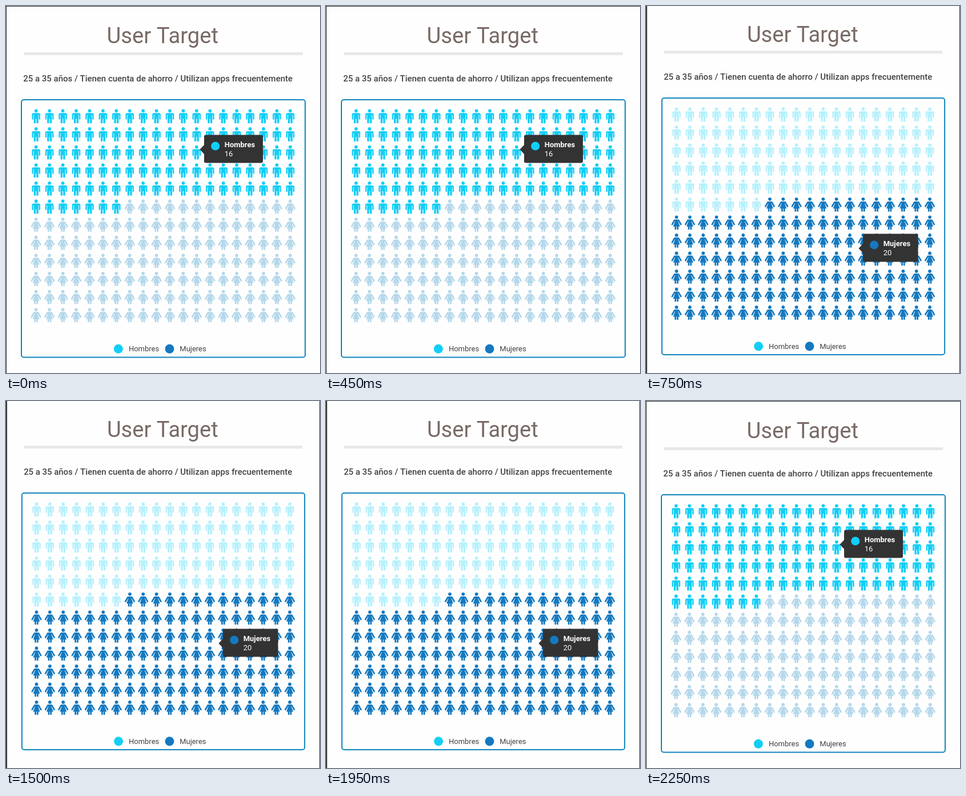
Animation of 550 by 642 pixels, one loop 3 s. Source, as an HTML page with a canvas:

```html
<!DOCTYPE html>
<html lang="es">
<head>
<meta charset="utf-8">
<title>User Target</title>
<style>
  html, body { margin: 0; width: 100%; height: 100%; overflow: hidden; background: #fefefe; }
  canvas { display: block; }
</style>
</head>
<body>
<canvas id="stage" width="550" height="642"></canvas>
<script>
const ctx = document.getElementById('stage').getContext('2d');
const LOOP = 3000;
const COLS = 20, ROWS = 12, MEN = 107;
const CYAN = '#12cef6', BLUE = '#1479bf', DARK = '#333333';
const PALE_CYAN = '#b6f1fd', PALE_BLUE = '#b5d8eb';

const men = {
  scale: 1, dx: 0, dy: 0, man: CYAN, woman: PALE_BLUE,
  tip: { x: 347, y: 226, w: 103, color: CYAN, label: 'Hombres', value: '16' }
};
const women = {
  scale: 0.9965, dx: 0.96, dy: -2.4, man: PALE_CYAN, woman: BLUE,
  tip: { x: 380, y: 399, w: 96.5, color: BLUE, label: 'Mujeres', value: '20' }
};

function polygon(path, ...points) {
  points.forEach(([x, y], i) => i ? path.lineTo(x, y) : path.moveTo(x, y));
  path.closePath();
}

// Both icons are 25 high, centred on x = 0, with the head at the top.
function manShape() {
  const p = new Path2D();
  p.arc(0, 3, 2.9, 0, Math.PI * 2);
  p.closePath();
  p.roundRect(-7.3, 7, 14.6, 3, [2.5, 2.5, 0, 0]);
  p.rect(-4, 10, 8, 7);
  for (const side of [-1, 1]) {
    p.roundRect(side * 6.1 - 1.2, 10, 2.4, 8.5, [0, 0, 1.2, 1.2]);
    p.roundRect(side * 2.3 - 1.7, 17, 3.4, 8, [0, 0, 1, 1]);
  }
  return p;
}

function womanShape() {
  const p = new Path2D();
  p.arc(0, 3, 2.9, 0, Math.PI * 2);
  p.closePath();
  polygon(p, [-3, 8], [3, 8], [2.6, 10.5], [6, 19.5], [-6, 19.5], [-2.6, 10.5]);
  for (const side of [-1, 1]) {
    p.roundRect(side * 1.9 - 1.4, 19.5, 2.8, 5.5, [0, 0, 1, 1]);
  }
  return p;
}

const manPath = manShape();
const womanPath = womanShape();

function disc(x, y, r, color) {
  ctx.fillStyle = color;
  ctx.beginPath();
  ctx.arc(x, y, r, 0, Math.PI * 2);
  ctx.fill();
}

function text(str, x, y, weight, size, color) {
  ctx.font = `${weight} ${size}px Roboto, sans-serif`;
  ctx.fillStyle = color;
  ctx.fillText(str, x, y);
}

function person(x, y, isMan, color) {
  ctx.save();
  ctx.translate(x, y);
  ctx.fillStyle = ctx.strokeStyle = color;
  ctx.fill(isMan ? manPath : womanPath);
  if (!isMan) {
    ctx.lineWidth = 2.7;
    ctx.lineCap = ctx.lineJoin = 'round';
    ctx.beginPath();
    ctx.moveTo(-7.7, 15.8);
    ctx.lineTo(-3.5, 8.4);
    ctx.lineTo(3.5, 8.4);
    ctx.lineTo(7.7, 15.8);
    ctx.stroke();
  }
  ctx.restore();
}

function page(state) {
  ctx.save();
  ctx.translate(state.dx, state.dy);
  ctx.scale(state.scale, state.scale);

  ctx.fillStyle = '#fefefe';
  ctx.fillRect(1, 1, 549, 660);
  text('User Target', 176.6, 65.2, 400, 38.2, '#786a65');
  ctx.fillStyle = '#e8e7e7';
  ctx.fillRect(31, 81, 489, 5);
  text('25 a 35 años / Tienen cuenta de ahorro / Utilizan apps frecuentemente',
    30.3, 132, 500, 14.96, '#424242');

  ctx.strokeStyle = '#1285bd';
  ctx.lineWidth = 2;
  ctx.beginPath();
  ctx.roundRect(27, 164, 497, 450.5, 4);
  ctx.stroke();

  for (let i = 0; i < COLS * ROWS; i++) {
    const x = 52.7 + (i % COLS) * 23.43;
    const y = 180.3 + Math.floor(i / COLS) * 31.63;
    const isMan = i < MEN;
    person(x, y, isMan, isMan ? state.man : state.woman);
  }

  disc(196.8, 599.8, 8, CYAN);
  text('Hombres', 214.9, 604.4, 400, 13, '#404040');
  disc(286.5, 599.8, 8, BLUE);
  text('Mujeres', 304.3, 604.4, 400, 13, '#404040');
  ctx.restore();
}

function tooltip({ x, y, w, color, label, value }) {
  const shape = new Path2D();
  shape.roundRect(x, y - 0.4, w, 49, 3);
  polygon(shape, [x, y + 33], [x - 7.5, y + 25], [x, y + 17]);
  ctx.fillStyle = DARK;
  ctx.fill(shape);
  disc(x + 19.7, y + 19, 7.6, color);
  text(label, x + 35.7, y + 21.2, 700, 13, '#ffffff');
  text(value, x + 35.7, y + 36.5, 400, 13, '#ffffff');
}

function draw(now) {
  const t = now % LOOP;
  const state = t >= 750 && t < 2250 ? women : men;
  ctx.fillStyle = DARK;
  ctx.fillRect(0, 0, 550, 642);
  page(state);
  tooltip(state.tip);
  requestAnimationFrame(draw);
}

draw(0);
</script>
</body>
</html>
```
